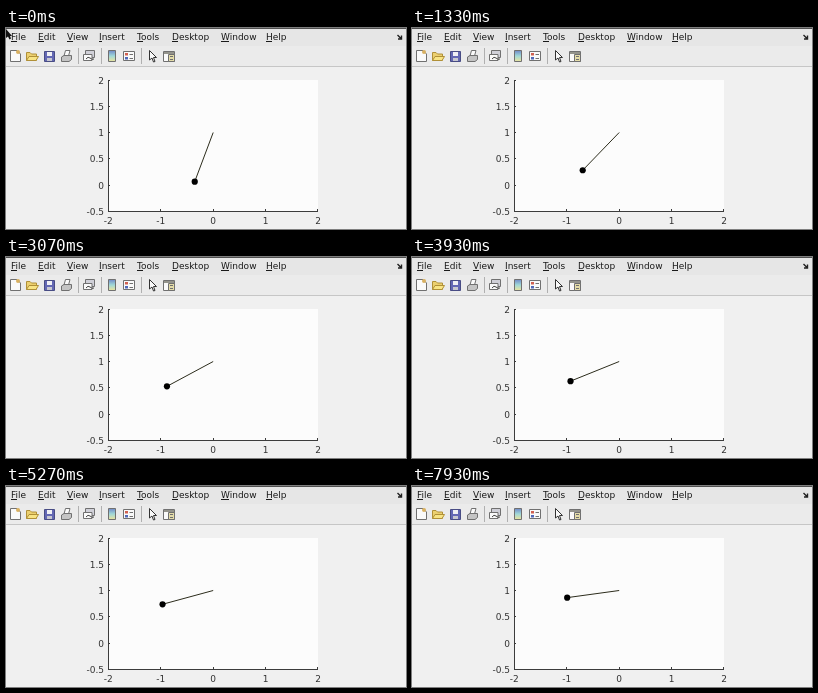
Recreate the animation shown at these times as an HTML page. Size 400x201 px, loop 8000 ms.

```html
<!DOCTYPE html>
<html lang="en">
<head>
<meta charset="utf-8">
<title>Pendulum figure</title>
<style>
  html, body { margin: 0; width: 100%; height: 100%; overflow: hidden; background: #f0f0f0; }
  svg { display: block; width: 400px; height: 201px; }
  .menu { font: 9px "DejaVu Sans", sans-serif; fill: #1a1a1a; }
  .ticks { font: 9px "DejaVu Sans", sans-serif; fill: #303030; }
  .axis { stroke: #3c3c3c; fill: none; shape-rendering: crispEdges; }
  .icon { stroke-width: 1; stroke: #707070; fill: #fafafa; }
</style>
</head>
<body>
<svg viewBox="0 0 400 201">
  <rect width="400" height="201" fill="#f0f0f0"/>
  <rect width="400" height="18" fill="#e6e6e6"/>
  <rect y="18" width="400" height="20" fill="#ebebeb"/>
  <path d="M0 .5H400" stroke="#505050"/>
  <path d="M0 38.5H400" stroke="#c6c6c6"/>
  <path d="M72.5 20V36M95.5 20V36M135.5 20V36" stroke="#b0b0b0"/>
  <g class="menu" id="menu"></g>
  <path d="M391.5 7L395 10.5M395.5 7.5V11H392" stroke="#222" stroke-width="1.4" fill="none"/>

  <g class="icon">
    <!-- new, open, save, print -->
    <path d="M4.500 22.500H11L14.500 26V33.500H4.500Z"/>
    <circle cx="12" cy="24" r="2" fill="#d8b060" stroke="none"/>
    <path d="M20.500 32.500V24.500H24L25.500 26H30.500V32.500Z" fill="#ecd070" stroke="#b09038"/>
    <path d="M20.500 32.500L23 28.500H32.500L30 32.500Z" fill="#f8e484" stroke="#b09038"/>
    <path d="M38.500 23.500H48.500V33.500H38.500Z" fill="#6468b4" stroke="#484c84"/>
    <path d="M41 24H46V28H41Z" fill="#f0f0f4" stroke="none"/>
    <path d="M41 30H46V33H41Z" fill="#c8c8d0" stroke="none"/>
    <path d="M58 28L59.500 22.500H64L62.500 28"/>
    <path d="M55.500 29L58 27.500H65.500V31.500L63 33.500H55.500Z" fill="#c4c4c4"/>
    <!-- link -->
    <path d="M79.500 22.500H88.500V29.500H79.500Z" fill="#d0d0d8"/>
    <path d="M77.500 26.500H86V32.500H77.500Z"/>
    <path d="M80 31Q82 28 84 30T88 31" fill="none" stroke="#444"/>
    <!-- colour bar, legend -->
    <path d="M102.500 22.500H109.500V33.500H102.500Z" fill="url(#bar)"/>
    <path d="M117.500 23.500H128.500V32.500H117.500Z"/>
    <path d="M119 25H122V27.500H119Z" fill="#d06050" stroke="none"/>
    <path d="M119 29H122V31.500H119Z" fill="#5068b8" stroke="none"/>
    <path d="M123.500 26.500H127M123.500 30.500H127"/>
    <!-- pointer, inspector -->
    <path d="M143.500 22.500V32L146 30L147.500 34L149 33.500L147.500 29.500H150.500Z" stroke="#333"/>
    <path d="M157.500 23.500H168.500V33.500H157.500Z"/>
    <path d="M158 24H168V26H158Z" fill="#94948c" stroke="none"/>
    <path d="M162.500 26.500H168.500V33.500H162.500Z" fill="#e4dca8"/>
    <path d="M164 28.500H167M164 31.500H167"/>
  </g>
  <defs>
    <linearGradient id="bar" x2="0" y2="1">
      <stop stop-color="#7088c8"/><stop offset=".5" stop-color="#a0d8d8"/>
      <stop offset="1" stop-color="#ece49c"/>
    </linearGradient>
  </defs>

  <rect x="102" y="52" width="210" height="131" fill="#fcfcfc"/>
  <path class="axis" d="M102.500 52V183.500H312"/>
  <path class="axis" id="marks"/>
  <g class="ticks" id="ticks"></g>
  <line id="rod" stroke="#2c2c1c" stroke-width="1"/>
  <circle id="bob" r="3.100" fill="#000"/>
  <path id="pointer" d="M0 1V10L2 8.500L3.500 11.500L5 10.500L4 8H6Z" fill="#111"/>
</svg>
<script>
const byId = id => document.getElementById(id);

function addText(parent, text, x, y, anchor = "start") {
  const node = document.createElementNS("http://www.w3.org/2000/svg", "text");
  node.setAttribute("x", x);
  node.setAttribute("y", y);
  node.setAttribute("text-anchor", anchor);
  node.textContent = text;
  parent.append(node);
}

const menu = { File: 5, Edit: 32, View: 61, Insert: 93, Tools: 131, Desktop: 166, Window: 215, Help: 260 };
for (const [label, x] of Object.entries(menu)) {
  addText(byId("menu"), label, x, 12);
  const line = document.createElementNS("http://www.w3.org/2000/svg", "path");
  line.setAttribute("d", `M${x} 13.5h${label[0] === "W" ? 8 : label[0] === "I" ? 3 : 6}`);
  line.setAttribute("stroke", "#1a1a1a");
  byId("menu").append(line);
}

const UNIT = 52.5;
const plotX = x => 207.2 + x * UNIT;
const plotY = y => 157 - y * UNIT;
let marks = "";
for (let x = -2; x <= 2; x++) {
  addText(byId("ticks"), x, plotX(x), 195.5, "middle");
  marks += `M${Math.min(311, Math.floor(plotX(x))) + 0.5} 183v-2`;
}
for (let y = -0.5; y <= 2; y += 0.5) {
  addText(byId("ticks"), y, 98, plotY(y) + 3.5, "end");
  marks += `M102 ${Math.floor(plotY(y)) + 0.5}h2`;
}
byId("marks").setAttribute("d", marks);

// Time in ms and degrees left until the rod is level; decays exponentially between rows.
const swing = [
  [0, 69.4], [870, 54.4], [1330, 46], [2200, 36.3], [3930, 22],
  [5270, 15.2], [6330, 11.7], [7930, 7.8]
];

function degreesLeft(time) {
  const i = Math.max(1, swing.findIndex(([at]) => at >= time));
  const [t0, a0] = swing[i - 1], [t1, a1] = swing[i];
  return a0 * Math.pow(a1 / a0, (time - t0) / (t1 - t0));
}

const LOOP = 8000, STEP = LOOP / 120;
const rod = byId("rod"), bob = byId("bob"), pointer = byId("pointer");
rod.setAttribute("x1", plotX(0));
rod.setAttribute("y1", plotY(1));

function draw(time) {
  const step = Math.min(119, Math.floor((time % LOOP + 5) / STEP));
  const angle = degreesLeft(Math.min(7930, step * STEP)) * Math.PI / 180;
  const x = plotX(-Math.cos(angle)), y = plotY(1 - Math.sin(angle));
  rod.setAttribute("x2", x);
  rod.setAttribute("y2", y);
  bob.setAttribute("cx", x);
  bob.setAttribute("cy", y);
  pointer.style.display = step === 0 ? "" : "none";
}

const start = performance.now();
function tick() {
  draw(performance.now() - start);
  requestAnimationFrame(tick);
}
tick();
</script>
</body>
</html>
```
